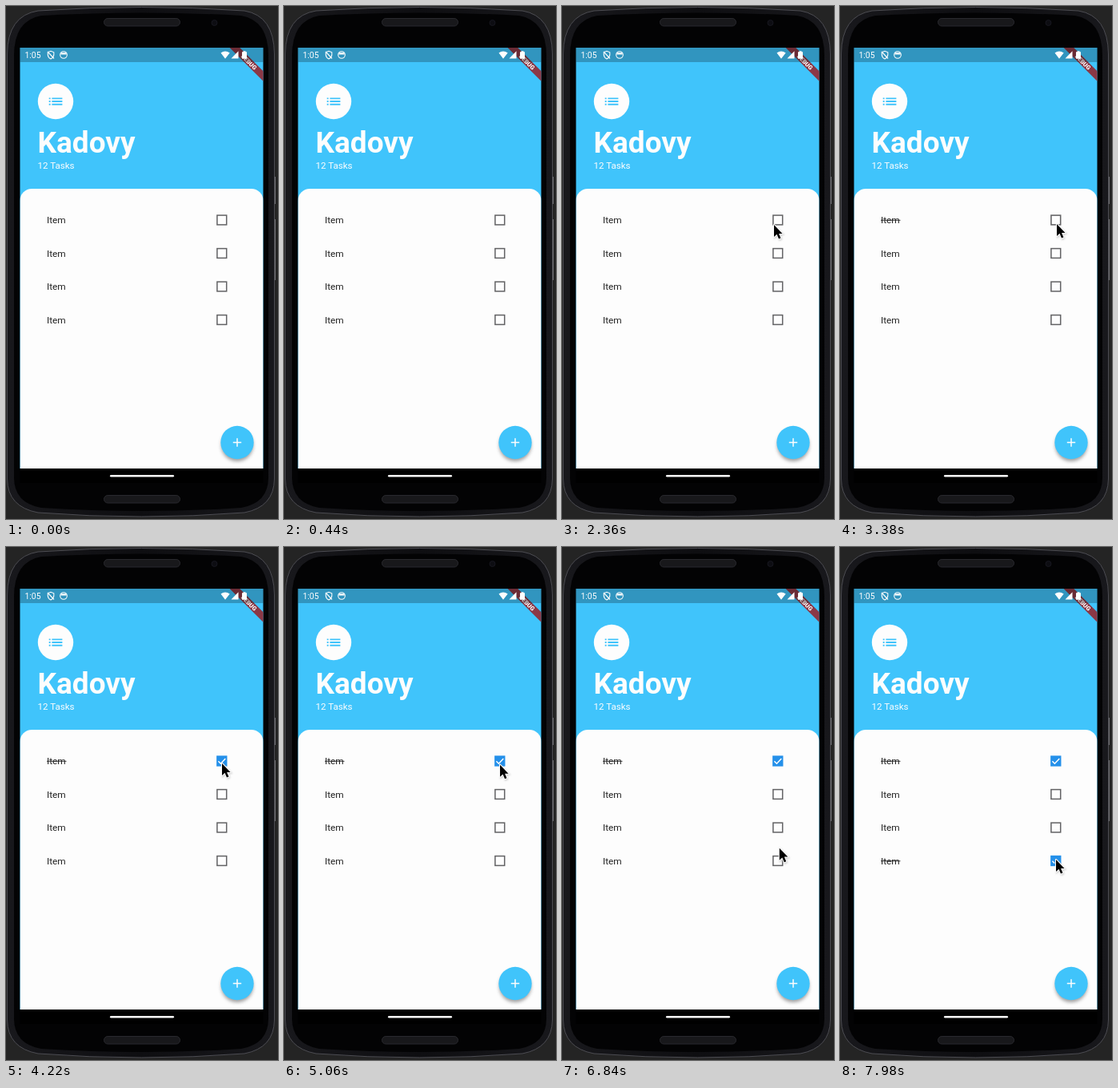
Animation, 340 px wide and 640 px high, one loop 8 s. Source, as an HTML page:

```html
<!DOCTYPE html>
<html lang="en">
<head>
<meta charset="utf-8">
<title>To-do list</title>
<style>
html, body { margin: 0; width: 100%; height: 100%; overflow: hidden; background: #242424; }
svg { display: block; width: 340px; height: 640px; font-family: Roboto, sans-serif; }
</style>
</head>
<body>
<svg viewBox="0 0 340 640">
  <defs>
    <linearGradient id="rim" x2="1">
      <stop offset="0" stop-color="#18181c"/><stop offset=".5" stop-color="#0e0e11"/><stop offset="1" stop-color="#18181c"/>
    </linearGradient>
    <clipPath id="screen"><path d="M17.500 52H321.500V577H17.500Z"/></clipPath>
    <filter id="soft" x="-50%" y="-50%" width="200%" height="200%"><feGaussianBlur stdDeviation="2.200"/></filter>
    <filter id="halo" x="-50%" y="-50%" width="200%" height="200%"><feGaussianBlur stdDeviation="1"/></filter>
    <path id="arrow" d="M0 0V17L4 13.300L6.800 20L9.600 18.800L6.900 12.400H12Z"/>
  </defs>

  <!-- phone -->
  <path d="M335 213h2v34h-2zM335 266h2v76h-2z" fill="#707074"/>
  <path d="M1.500 60Q2 12 40 6Q170-3 298 6Q335 12 335.500 60V590Q335 625 298 632Q170 642 40 632Q2 625 1.500 590Z" fill="url(#rim)" stroke="#4c4c52"/>
  <path d="M10 62Q10 18 44 12Q170 5 294 12Q328 18 328 62V588Q328 620 294 626Q170 634 44 626Q10 620 10 588Z" fill="#030304"/>
  <g fill="#18181b" stroke="#29292e">
    <rect x="122.500" y="15.500" width="95" height="9.500" rx="4.700"/>
    <rect x="122.500" y="610.500" width="95" height="9.500" rx="4.700"/>
    <circle cx="260.500" cy="21" r="3.500" fill="#0d0d12" stroke="#17171f"/>
  </g>
  <path d="M17.500 52H321.500V595H17.500Z" fill="#000"/>
  <rect x="130" y="585" width="80" height="2.400" rx="1.200" fill="#fdfdfd"/>

  <!-- app -->
  <g clip-path="url(#screen)">
    <path d="M17 52H322V577H17Z" fill="#40c4fb"/>
    <circle cx="62" cy="119" r="22.200" fill="#fdfdfd"/>
    <path d="M53.700 115.300h1.900m1.800 0h13M53.700 119h1.900m1.800 0h13M53.700 122.700h1.900m1.800 0h13" stroke="#40c4fb" stroke-width="1.850"/>
    <text x="39.500" y="183" font-size="37" font-weight="700" fill="#fdfdfd">Kadovy</text>
    <text x="39.500" y="203" font-size="11.600" fill="#fdfdfd">12 Tasks</text>
    <path d="M17.500 577V242.800A14.800 14.800 0 0 1 32.300 228H306.700A14.800 14.800 0 0 1 321.500 242.800V577Z" fill="#fdfdfd"/>
    <g id="rows"></g>
    <circle cx="289" cy="548" r="20" fill="#444" opacity=".5" filter="url(#soft)"/>
    <circle cx="289" cy="544.500" r="20.700" fill="#40c4fb"/>
    <path d="M283.800 544.500h10.400M289 539.300v10.400" stroke="#fdfdfd" stroke-width="1.500"/>
    <g transform="translate(321.500 52) rotate(45)">
      <path d="M-29.600 20.700h59.200v8.900h-59.200z" fill="#8b3846"/>
      <text y="27.900" font-size="7.500" font-weight="900" text-anchor="middle" fill="#fdfdfd">DEBUG</text>
    </g>
    <path d="M17 52H322V70H17Z" opacity=".24"/>
    <text x="23.500" y="65" font-size="10.400" fill="#fdfdfd">1:05</text>
    <g fill="none" stroke="#fdfdfd" stroke-width="1.100">
      <path d="M52.300 57.800L56 56.300L59.800 57.800V61Q59.500 64.300 56 66Q52.500 64.300 52.300 61ZM52 57L60 65.500"/>
      <circle cx="72" cy="61" r="4.300"/>
      <path d="M68.500 59.300h7" stroke-width="2.200"/>
    </g>
    <path d="M268.500 58.500Q274 54.300 279.700 58.500L274 65.800ZM281.500 65.500L290.500 56.300V65.500ZM295 57.300h1.500v-1.100h3v1.100h1.500v8.500h-6z" fill="#fdfdfd"/>
  </g>

  <g id="cursor">
    <use href="#arrow" x="1" y="1.500" fill="#888" stroke="#aaa" stroke-width="2" opacity=".6" filter="url(#halo)"/>
    <use href="#arrow" stroke="#fdfdfd" stroke-width="2.400" paint-order="stroke" stroke-linejoin="round"/>
  </g>
</svg>
<script>
const LOOP = 8000;
const NS = 'http://www.w3.org/2000/svg';
const rowTimes = [3380, Infinity, Infinity, 7850];
const path = [
  [560, 342, 300], [1000, 292, 270], [1500, 292, 270], [2100, 265, 273],
  [2800, 265, 273], [3250, 271, 272], [3700, 271, 272], [4100, 270, 270],
  [5000, 270, 270], [5800, 272, 374], [6700, 272, 374], [7400, 270, 390], [8000, 270, 390]
];
const cursor = document.getElementById('cursor');
const clamp = v => Math.max(0, Math.min(1, v));
const smooth = v => v * v * (3 - 2 * v);

function add(parent, tag, attrs, text) {
  const el = document.createElementNS(NS, tag);
  for (const k in attrs) el.setAttribute(k, attrs[k]);
  if (text) el.textContent = text;
  parent.appendChild(el);
  return el;
}

const rows = rowTimes.map((at, i) => {
  const g = add(document.getElementById('rows'), 'g', { transform: `translate(0 ${267 + i * 41.5})` });
  add(g, 'text', { x: 51, y: 4, 'font-size': 11.84, fill: '#222' }, 'Item');
  const strike = add(g, 'path', { d: 'M51 .3H75.500', stroke: '#222', 'stroke-width': 0.9 });
  const box = add(g, 'rect', { fill: 'none' });
  const tick = add(g, 'path', {
    d: 'M265.400 .2L268.400 3.200L274.300 -3', fill: 'none', stroke: '#fdfdfd',
    'stroke-width': 1.5, pathLength: 1
  });
  return { at, strike, box, tick };
});

function drawRow({ at, strike, box, tick }, t) {
  const p = clamp((t - at) / 200);
  const fill = clamp(p * 2);
  const mark = clamp(p * 2 - 1);
  const w = 1.5 + fill * 5.15;
  const size = 13.3 - w;
  strike.style.display = t >= at ? '' : 'none';
  const attrs = {
    x: 269.8 - size / 2, y: -size / 2, width: size, height: size,
    'stroke-width': w, stroke: p > 0.12 ? '#2490ea' : '#626264'
  };
  for (const k in attrs) box.setAttribute(k, attrs[k]);
  tick.style.display = mark > 0 ? '' : 'none';
  tick.setAttribute('stroke-dasharray', `${mark} 2`);
}

function drawCursor(t) {
  cursor.style.display = t < path[0][0] ? 'none' : '';
  const i = Math.max(1, path.findIndex(p => p[0] > t));
  const [t0, x0, y0] = path[i - 1], [t1, x1, y1] = path[i];
  const k = smooth(clamp((t - t0) / (t1 - t0)));
  cursor.setAttribute('transform', `translate(${x0 + (x1 - x0) * k} ${y0 + (y1 - y0) * k}) scale(.88)`);
}

const start = performance.now();
function frame() {
  const t = (performance.now() - start) % LOOP;
  rows.forEach(r => drawRow(r, t));
  drawCursor(t);
  requestAnimationFrame(frame);
}
frame();
</script>
</body>
</html>
```
